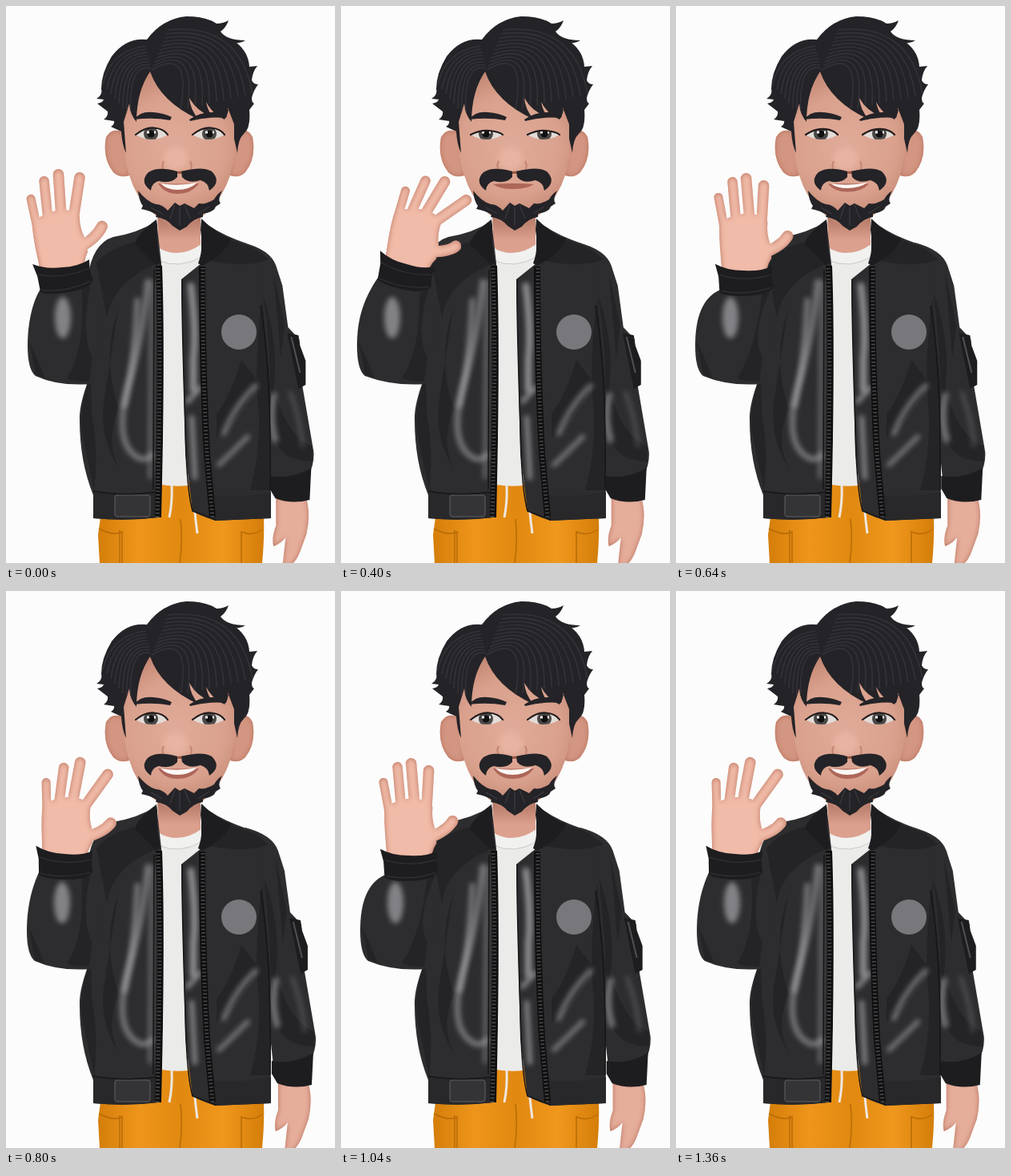
Recreate the animation shown at these times as an HTML page. Size 411x697 px, loop 1440 ms.

```html
<!DOCTYPE html>
<html lang="en">
<head>
<meta charset="utf-8">
<title>Waving avatar</title>
<style>
html, body { margin: 0; width: 100%; height: 100%; overflow: hidden; background: #fcfcfc; }
svg { display: block; width: 100%; height: 100%; }
.leather { fill: #2d2d2f; }
.dark { fill: #1d1d1f; }
.hem { fill: #28282a; }
.fold { fill: #242426; }
.hair { fill: #242327; }
.shine { fill: none; stroke: #b5b5b9; stroke-linecap: round; filter: url(#blur); }
.zip { fill: none; stroke: #0f0f10; stroke-width: 8; }
.teeth { fill: none; stroke: #4a4a4d; stroke-width: 5; stroke-dasharray: 1.5 3; }
.skin { fill: #f0bba8; filter: url(#round); }
.seam { fill: none; stroke: #161617; stroke-width: 1.5; }
</style>
</head>
<body>
<svg viewBox="0 0 411 697">
<defs>
  <filter id="blur" filterUnits="userSpaceOnUse" x="0" y="0" width="411" height="697"><feGaussianBlur stdDeviation="3"/></filter>
  <filter id="round" x="-10%" y="-10%" width="120%" height="120%" color-interpolation-filters="sRGB">
    <feGaussianBlur in="SourceAlpha" stdDeviation="3" result="soft"/>
    <feFlood flood-color="#b76f5b"/>
    <feComposite in2="soft" operator="out"/>
    <feComposite in2="SourceAlpha" operator="in" result="edge"/>
    <feMerge><feMergeNode in="SourceGraphic"/><feMergeNode in="edge"/></feMerge>
  </filter>
  <radialGradient id="face" gradientUnits="userSpaceOnUse" cx="212" cy="175" r="105">
    <stop offset="0" stop-color="#e0ab99"/><stop offset=".6" stop-color="#d9a18d"/><stop offset="1" stop-color="#bd806d"/>
  </radialGradient>
  <linearGradient id="neck" x2="0" y2="1">
    <stop offset=".2" stop-color="#b07562"/><stop offset=".7" stop-color="#dca18e"/>
  </linearGradient>
  <linearGradient id="pants">
    <stop offset="0" stop-color="#d47e0a"/><stop offset=".25" stop-color="#ef951b"/>
    <stop offset=".5" stop-color="#e08810"/><stop offset=".75" stop-color="#f0971d"/><stop offset="1" stop-color="#d47e0a"/>
  </linearGradient>
  <path id="hairShape" d="M113 116Q121 111 119 104Q119 84 132 63Q150 39 176 42Q195 16 225 13Q250 13 263 22Q271 22 278 18Q275 27 268 32Q276 43 299 43Q293 47 288 46Q303 58 304 76L314 75Q308 82 307 93Q309 98 315 98Q309 106 307 115Q307 121 310 122L304 130Q306 153 297 160Q290 166 289 184L285 166L285 148L277 127Q278 134 273 142Q258 135 250 120Q252 132 259 139Q239 133 229 115Q230 130 241 142Q193 120 180 82Q163 107 163 145Q155 136 154 122L147 145L150 184Q145 174 144 157L131 151Q136 148 135 144L122 142Q128 138 127 132L114 122Q121 121 122 117Z"/>
  <clipPath id="hairClip"><use href="#hairShape"/></clipPath>
  <clipPath id="lids"><path id="lidL"/><path id="lidR"/></clipPath>
</defs>
<rect width="411" height="697" fill="#fcfcfc"/>

<!-- trousers and shirt -->
<path d="M190 595H242L322 640Q323 665 320 697H117L115 662 118 640Z" fill="url(#pants)"/>
<path d="M116 654Q135 664 145 658V697M142 656V697M320 655Q308 664 294 658V697M218 642Q221 670 217 697" fill="none" stroke="#b86b06" stroke-width="1.5"/>
<path d="M207 600Q208 620 204 640M234 603Q235 630 239 660" fill="none" stroke="#eee7df" stroke-width="3"/>
<path d="M186 295L245 292L228 600Q208 602 188 598Z" fill="#ebebea"/>
<path d="M189 250H243V301Q216 320 190 302Z" fill="url(#neck)"/>
<path d="M189 302Q216 318 244 298V314Q216 330 189 318Z" fill="#f1f1f0"/>
<path d="M190 318Q216 330 244 314" fill="none" stroke="#c9c9c8"/>

<!-- right arm -->
<g id="restArm">
  <path class="skin" style="fill:#e5ae9b" d="M337 614L374 614Q381 635 375 661L368 680Q362 698 351 702L345 702L349 665Q344 672 334 676Q331 666 337 650Z"/>
  <path class="leather" d="M296 296Q330 305 337 325L345 350 352 402L366 417L369 470L384 558Q385 574 377 588L331 594L318 470L300 340Z"/>
  <path class="fold" d="M320 360Q341 420 334 480Q352 540 382 551L382 570Q345 570 334 540L326 470ZM334 335L348 400 343 440Z"/>
  <path class="dark" d="M329 588Q356 593 381 578L379 618Q356 624 336 616L329 604ZM351 409L365 412 367 425 374 444 374 474 365 479Z"/>
  <path d="M356 414L367 459" stroke="#505054" stroke-width="2"/>
  <path class="shine" d="M334 487Q328 515 336 543" stroke-width="7" opacity=".6"/>
  <path class="shine" d="M355 484Q368 520 370 550" stroke-width="5" opacity=".25"/>
</g>

<!-- jacket -->
<path class="leather" d="M188 269Q165 284 134 289Q108 297 102 340L106 460Q91 498 92 518Q92 570 109 612V641Q150 645 190 640L196 540 194 322Z"/>
<path class="leather" d="M244 267Q262 284 300 297Q324 310 321 360Q333 440 330 520L331 641L262 644Q245 639 233 632L224 560 219 342L244 322Z"/>
<path class="fold" d="M106 460Q92 500 94 530L110 606Q116 560 107 510ZM160 295Q125 305 113 322L126 390Q133 345 188 323L188 309ZM250 318Q300 329 328 317L310 303 260 285ZM320 365Q309 450 316 510Q318 560 305 606H330V470Z"/>
<path class="fold" d="M140 380Q119 440 141 505Q123 545 142 580Q117 543 122 497ZM294 443Q280 490 263 510V540Q296 511 315 470Z"/>
<path class="shine" d="M177 345Q170 420 151 480Q137 540 158 560Q172 573 182 562" stroke-width="7" opacity=".55"/>
<path class="shine" d="M164 368Q160 450 148 500" stroke-width="6" opacity=".6"/>
<path class="shine" d="M182 345L180 590" stroke-width="5" opacity=".45"/>
<path class="shine" d="M231 350Q238 410 234 440L234 480" stroke-width="8" opacity=".75"/>
<path class="shine" d="M227 495L242 478M232 515L236 590" stroke-width="6" opacity=".65"/>
<path class="shine" d="M312 475Q286 500 272 535M302 539Q276 565 266 574" stroke-width="6" opacity=".55"/>
<path class="dark" d="M188 267Q163 286 161 298L187 324L193 322Q187 294 189 276ZM244 266Q265 287 281 291Q276 309 245 325L240 322Q247 305 243 280Z"/>
<path class="hem" d="M109 607Q150 614 190 608V640Q150 645 109 641ZM254 612Q295 616 331 608V641L260 644Z"/>
<rect x="136" y="612" width="44" height="27" rx="3" fill="#343436" stroke="#606064"/>
<path class="zip" d="M191 325Q195 430 190 640M245 326Q245 450 251 560L258 640"/>
<path class="teeth" d="M190 328Q194 430 189 640M246 328Q245 450 251 560L258 640"/>
<path class="seam" d="M220 342Q219 380 225 560Q227 610 233 632L262 643M185 330L184 605M318 375Q332 460 330 606M109 607Q150 614 188 608"/>
<circle cx="291" cy="408" r="22" fill="#77777c"/>

<!-- head -->
<path class="skin" style="fill:#d39682" d="M151 161Q134 149 125 164Q120 190 134 208Q142 216 154 212ZM283 161Q301 149 308 164Q313 190 299 208Q291 216 280 212Z"/>
<path d="M147 130Q144 185 154 212Q166 252 202 272Q217 278 232 272Q267 252 280 212Q290 180 286 130L230 65H180Z" fill="url(#face)"/>
<ellipse cx="212" cy="191" rx="15" ry="14" fill="#e8b3a1" filter="url(#blur)"/>
<path d="M197 194Q193 202 199 207M230 194Q234 202 229 207" fill="none" stroke="#c38571" stroke-width="2"/>
<path d="M201 207Q214 210 228 207" stroke="#985944" stroke-width="3" fill="none"/>
<g clip-path="url(#lids)">
  <path d="M155 145H280V175H155Z" fill="#e2dcd9"/>
  <circle cx="181" cy="160" r="9" fill="#4b4947"/><circle cx="254" cy="160" r="9" fill="#4b4947"/>
  <circle cx="181" cy="160" r="4.5" fill="#111"/><circle cx="254" cy="160" r="4.5" fill="#111"/>
  <path d="M176 158h3M185 158h2M249 158h3M258 158h2" stroke="#fff" stroke-width="3"/>
</g>
<path id="lashes" fill="none" stroke="#221b1b" stroke-width="2.2" stroke-linecap="round"/>
<path class="hair" d="M160 142Q168 131 184 133Q197 134 207 139L205 143Q184 139 160 142ZM229 142Q242 133 258 133Q270 128 278 130L275 140Q252 138 230 144Z"/>
<path id="lips" fill="#ad6659"/>
<path id="teeth" fill="#fbf7f4"/>
<path class="hair" d="M214 207Q190 200 178 208Q166 220 181 231Q182 221 191 219Q206 223 214 214ZM219 207Q246 200 257 207Q270 220 254 231Q253 221 243 218Q228 223 220 214Z"/>
<path class="hair" d="M165 231Q166 244 171 250L169 254Q180 256 188 261L187 264Q201 266 208 275L217 281 226 276Q234 266 246 264L246 260Q260 258 262 251L268 247Q264 243 270 231Q263 236 260 242Q249 249 241 247L235 253 223 247 217 250 211 246 202 256Q195 248 187 248Q176 245 165 231Z"/>
<path d="M211 249L205 266M217 252V275M223 249L230 266M181 252L195 260M254 251L240 260" stroke="#414045" fill="none"/>
<use href="#hairShape" class="hair"/>
<g id="strands" clip-path="url(#hairClip)" fill="none" stroke="#333238" stroke-width="1.6"></g>

<!-- waving arm -->
<path id="sleeve" class="leather"/>
<path id="crease" class="fold"/>
<ellipse id="gloss" rx="10" ry="26" fill="#b0b0b5" opacity=".65" filter="url(#blur)"/>
<g id="hand" class="skin" stroke="#f0bba8" stroke-linecap="round"></g>
<g id="cuff">
  <path class="dark" d="M-36 -9Q-20 0 0 0Q20 2 35 -5L34 8 36 21Q30 32 0 32Q-25 32 -31 27L-32 7Z"/>
  <path d="M-31 5Q0 15 33 6M-29 25Q0 32 33 22" fill="none" stroke="#353538"/>
</g>
</svg>
<script>
const $ = id => document.getElementById(id);
const SVG = 'http://www.w3.org/2000/svg';
const add = (parent, attrs) => {
  const el = document.createElementNS(SVG, 'path');
  for (const key in attrs) el.setAttribute(key, attrs[key]);
  return parent.appendChild(el);
};
const draw = (id, d) => $(id).setAttribute('d', d);

for (let i = 0; i < 11; i++) {
  add($('strands'), { d: `M${182 + i * 2} ${80 - i * 5}Q${232 + i * 6} ${50 - i * 3} ${218 + i * 9} ${130 - i * 2}` });
  if (i < 8) add($('strands'), { d: `M${181 - i} ${78 - i * 4}Q${152 - i * 3} ${70 - i * 2} ${156 - i * 5} ${140 - i * 6}` });
}

// One wave: wrist x, wrist y, tilt, elbow x, then tips from little finger to thumb
const poses = [
  [85, 331, -1, 24, 52, 234, 70, 214, 87, 209, 110, 218, 145, 284],
  [90, 335, 6, 24, 68, 235, 89, 219, 104, 212, 125, 221, 156, 292],
  [82, 323, 13, 20, 82, 226, 108, 213, 133, 214, 162, 239, 150, 299],
  [73, 329, 2, 26, 50, 234, 73, 215, 94, 208, 131, 224, 137, 287],
  [70, 327, -8, 27, 30, 236, 47, 213, 65, 204, 93, 208, 125, 271],
  [70, 326, -13, 32, 19, 241, 37, 214, 58, 204, 82, 204, 109, 262],
  [66, 328, -18, 34, 8, 251, 25, 222, 46, 208, 71, 205, 100, 257]
];
const phases = [4, 4.6, 0, 1, 1.5, 2, 3, 4.6, 0, 1, 3, 5, 6, 0, 1, 1.5, 2, 3];
const smiles = [1, .8, .4, 0, 0, 0, .1, .3, .6, .85, 1, 1, 1, 1, 1, 1, 1, 1];
const bases = [[-24, -55], [-9, -63], [8, -65], [23, -60], [26, -22]];
const widths = [11, 12.5, 13.5, 13.5, 14];

const palm = add($('hand'), { d: 'M-27 12C-27 -15 -31 -34 -29 -58Q-18 -70 8 -71Q28 -68 30 -60Q28 -45 33 -32L34 -15Q26 -3 27 12Z' });
const fingers = widths.map(w => add($('hand'), { 'stroke-width': w, fill: 'none' }));

function drawArm(phase) {
  const from = poses[Math.floor(phase)], to = poses[Math.ceil(phase)];
  const [x, y, tilt, elbow, ...tips] = from.map((v, i) => v + (to[i] - v) * (phase % 1));
  const a = tilt * Math.PI / 180;
  const turn = (px, py) => [x + px * Math.cos(a) - py * Math.sin(a), y + px * Math.sin(a) + py * Math.cos(a)];
  const place = `translate(${x} ${y}) rotate(${tilt})`;
  palm.setAttribute('transform', place);
  $('cuff').setAttribute('transform', place);
  fingers.forEach((finger, i) => {
    const [bx, by] = turn(...bases[i]);
    const dx = tips[i * 2] - bx, dy = tips[i * 2 + 1] - by;
    const reach = 1 - widths[i] / 2 / Math.hypot(dx, dy);
    const bend = i === 4 ? 4 : 0;
    finger.setAttribute('d', `M${bx} ${by}Q${bx + dx / 2 + bend} ${by + dy / 2 + bend} ${bx + dx * reach} ${by + dy * reach}`);
  });
  const left = turn(-31, 24), right = turn(34, 22);
  draw('sleeve', `M${left}C${elbow + 9} 365 ${elbow} 390 ${elbow} 425Q${elbow} 455 ${elbow + 10} 463Q65 476 106 473L122 400 ${right}Z`);
  draw('crease', `M${right}Q92 410 108 440L104 470Q85 470 76 466Q99 432 ${right[0] - 12} ${right[1] + 8}ZM${elbow + 2} 420Q${elbow + 14} 445 ${elbow + 22} 466L${elbow + 10} 461Z`);
  $('gloss').setAttribute('cx', elbow + 44);
  $('gloss').setAttribute('cy', 390);
}

function drawFace(smile) {
  const top = 155 - smile * 3.5;
  const upper = x => `M${x - 20} 161Q${x - 8} ${top} ${x + 3} ${top + 1}Q${x + 15} ${top + 2} ${x + 20} 161`;
  const lower = x => `Q${x} 173 ${x - 20} 161Z`;
  draw('lidL', upper(182) + lower(182));
  draw('lidR', upper(253) + lower(253));
  draw('lashes', upper(182) + upper(253));
  const corner = 223 - smile, bottom = 229 + smile * 6;
  draw('lips', `M190 ${corner}Q214 ${221 + smile * 2} 241 ${corner}Q232 ${bottom} 214 ${bottom}Q198 ${bottom} 190 ${corner}Z`);
  draw('teeth', `M193 222Q214 226 239 221Q229 ${225 + smile * 5} 214 ${225 + smile * 5}Q201 ${225 + smile * 5} 193 222Z`);
  $('teeth').setAttribute('opacity', Math.min(1, smile * 2));
}

function frame(now) {
  const step = Math.floor(now % 1440 / 80);
  drawArm(phases[step]);
  drawFace(smiles[step]);
  const sway = 1.5 - 1.5 * Math.cos((step - 2) / 9 * Math.PI);
  $('restArm').setAttribute('transform', `translate(${sway} 0)`);
  requestAnimationFrame(frame);
}
frame(performance.now());
</script>
</body>
</html>
```
